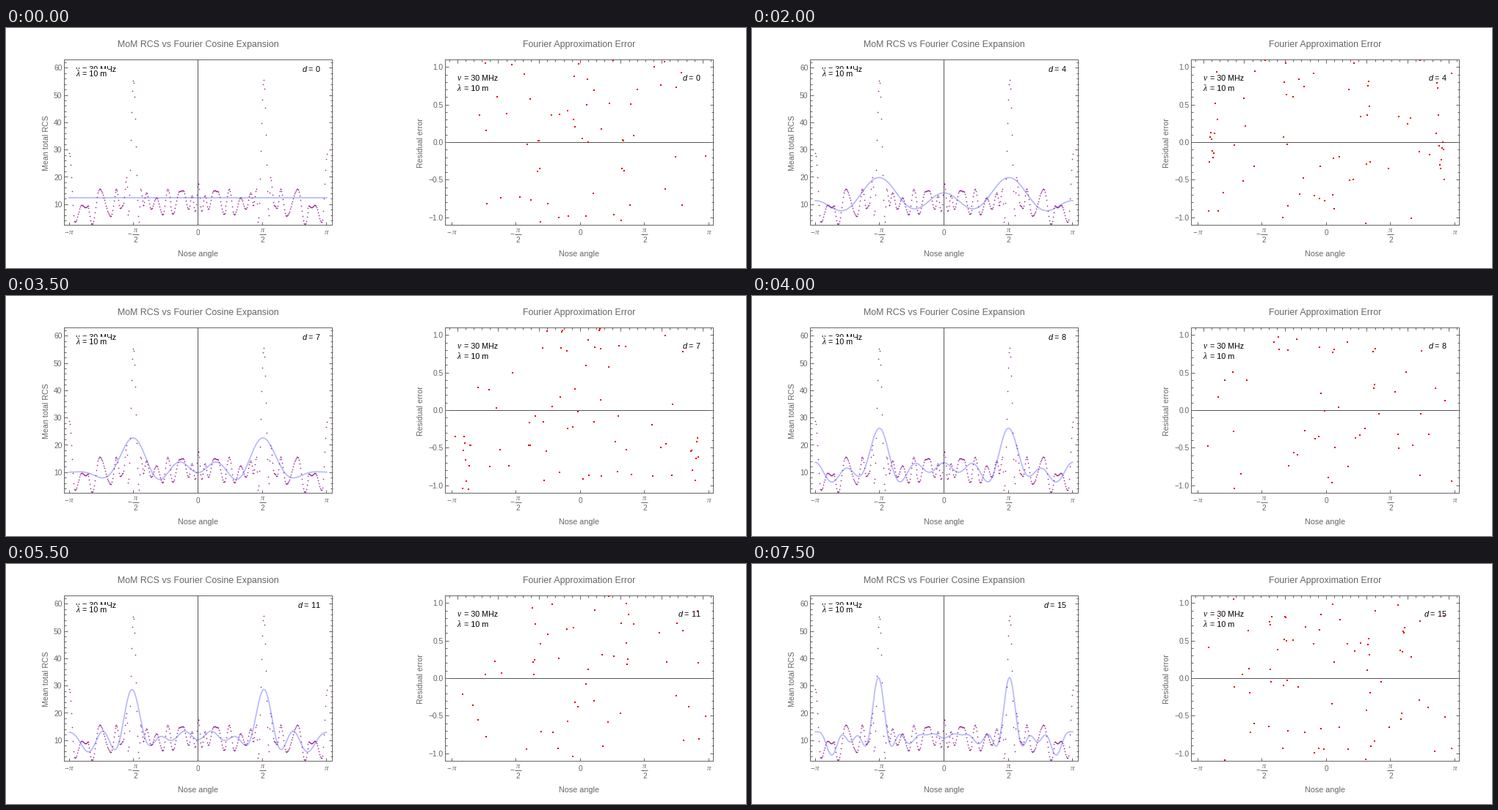
A matplotlib script that plays this animation: 1008 by 328 pixels, repeating every 8000 ms.

```python
import numpy as np
import matplotlib.pyplot as plt
from matplotlib.animation import FuncAnimation

plt.rcParams.update({
    "font.family": "Liberation Sans",
    "mathtext.fontset": "custom",
    "mathtext.rm": "Liberation Sans",
    "mathtext.it": "Liberation Sans:italic",
})

W, H, DPI = 1008, 328, 64
PT = 72 / DPI                      # points per pixel
GREY, AXIS, INK = "#666666", "#555555", "black"
TOP, BOTTOM = 43, 269
DEGREES = 16

# Turning points of the scattering lobes: angle from the nose, mean level
LOBES = [
    (0, 17.6), (4.5, 7.6), (9, 13.3), (13.5, 8.4), (21, 15.2), (26, 14.9),
    (35, 6.5), (43, 15.6), (49.6, 6.3), (58.5, 12.5), (65.5, 8.3),
    (72, 14.3), (76.5, 9.7), (80.9, 15.7), (83, 3.5), (90.7, 55.6),
    (97.8, 6), (99.6, 20), (105, 9.7), (108.5, 8.6), (114, 15.8),
    (122.5, 5.8), (137.8, 15.7), (148, 2.7), (154.5, 9.5), (158, 8.9),
    (163, 9.9), (172.5, 3.5), (180, 28.8),
]


def level(deg):
    """Cosine-eased lobes, mirrored; the right half sits a little further out."""
    angle, value = np.array(LOBES).T
    u = np.abs(deg)
    u = np.where(deg > 0, np.abs(u - np.interp(u, [0, 140, 180], [0.7, 1.4, 0.4])), u)
    i = np.clip(np.searchsorted(angle, u, side="right") - 1, 0, len(angle) - 2)
    t = (u - angle[i]) / (angle[i + 1] - angle[i])
    return value[i] + (value[i + 1] - value[i]) * (1 - np.cos(np.pi * t)) / 2


def cosines(deg, count):
    return np.cos(np.outer(np.radians(deg), np.arange(count)))


deg = np.arange(-180, 181)
fine = np.linspace(-180, 180, 721)
rcs = level(deg)
coef = 2 * np.mean(rcs[1:, None] * cosines(deg[1:], DEGREES), axis=0)
coef[0] /= 2


def expansion(x, degree):
    return cosines(x, degree + 1) @ coef[:degree + 1]


def left_x(a):
    return 261.5 + 0.974 * a


def left_y(v):
    return 241.2 - 3.728 * (v - 10)


def right_x(a):
    return 782.3 + 0.972 * a


def right_y(v):
    return 156.5 - 102.7 * v


fig = plt.figure(figsize=(W / DPI, H / DPI), dpi=DPI, facecolor="white")
ax = fig.add_axes([0, 0, 1, 1])
ax.set_xlim(0, W)
ax.set_ylim(H, 0)
ax.axis("off")


def line(xs, ys, color=GREY):
    """Crisp one-pixel line; whole coordinates name the pixel."""
    ax.plot(np.floor(xs), np.floor(ys), color=color, lw=PT, zorder=2,
            snap=True, solid_capstyle="butt")


def text(x, y, s, size=10.8, color=GREY, **kw):
    kw = {"ha": "center", "va": "baseline", "zorder": 7, **kw}
    return ax.text(x, y, s, fontsize=size * PT, color=color, **kw)


def greek(x, y, s, size=11.5, color=INK, **kw):
    return text(x, y, s, size, color, family="Liberation Serif",
                style="italic", **kw)


def cover(x, y, w, h):
    ax.add_patch(plt.Rectangle((x, y), w, h, fc="white", ec="none", zorder=6))


def note(x, y, symbol, s, z=7):
    greek(x + 1.5, y, symbol, zorder=z)
    text(x + 8, y, s, color=INK, ha="left", zorder=z)


def angle_label(x, q):
    """Label for q quarter turns."""
    if q == 0:
        text(x, 283, "0", 10)
    elif q % 2:
        x += 2.5 if q < 0 else 0
        greek(x, 279, "π", 10.5, GREY)
        line([x - 4, x + 5], [282, 282])
        text(x, 293, "2", 10)
        if q < 0:
            text(x - 7.5, 285.5, "−", 10)
    else:
        greek(x + (3 if q < 0 else 0), 282.5, "π", 11, GREY)
        if q < 0:
            text(x - 4, 283, "−", 10)


def panel(x0, x1, title, ylabel, label_x, to_x):
    line([x0, x1, x1, x0, x0], [TOP, TOP, BOTTOM, BOTTOM, TOP])
    mid = (x0 + x1) / 2
    text(mid, 26, title, 12.4)
    text(mid, 312, "Nose angle")
    text(label_x, 157, ylabel, 10.6, rotation=90, va="center")
    for q in range(-2, 3):
        x = to_x(90 * q)
        line([x, x], [BOTTOM, BOTTOM - 4])
        angle_label(x, q)


def y_ticks(x0, x1, values, to_y, every, fmt):
    for v in values:
        y = to_y(v)
        major = abs(v / every - round(v / every)) < 1e-6
        size = 5 if major else 3
        line([x0, x0 + size], [y, y])
        line([x1 - size + 1, x1 + 1], [y, y])
        if major:
            label = fmt.format(v + 0.0).replace("-", "−")
            text(x0 - 2.5, y + 3.6, label, 10.2, ha="right")


# Left panel: samples and expansion
panel(79, 444, "MoM RCS vs Fourier Cosine Expansion", "Mean total RCS",
      54.5, left_x)
line([261, 261], [TOP, BOTTOM], AXIS)
y_ticks(79, 444, range(4, 63, 2), left_y, 10, "{:.0f}")
note(96, 60, "ν", "= 30 MHz", z=5)
cover(93, 55.5, 46, 13)
note(96, 66, "λ", "= 10 m")

# Right panel: residuals
panel(598, 963, "Fourier Approximation Error", "Residual error",
      565.5, right_x)
line([598, 963], [156, 156], AXIS)
y_ticks(598, 963, np.arange(-10, 11) / 10, right_y, 0.5, "{:.1f}")
for i in range(-16, 17):
    x = right_x(np.degrees(i / 5))
    line([x, x], [TOP, TOP + (3 if i % 5 else 5)])
cover(614, 62, 59, 11.5)
cover(614, 76, 46, 11.5)
note(615.5, 72, "ν", "= 30 MHz")
note(615.5, 86, "λ", "= 10 m")

seen = rcs > 2.5
ax.plot(left_x(deg[seen]), left_y(rcs[seen]), "o", color=(0.5, 0, 0.5),
        ms=1.7 * PT, mew=0, alpha=0.8, zorder=3)
curve, = ax.plot([], [], color=(0.3, 0.3, 1), alpha=0.4, lw=1.7 * PT, zorder=4)
dots, = ax.plot([], [], "s", color="#ee0000", ms=2 * PT, mew=0, zorder=4)
counters = [text(428.5, 60, "", color=INK, ha="right"),
            text(946.5, 72, "", color=INK, ha="right")]


def draw(degree):
    curve.set_data(left_x(fine), left_y(expansion(fine, degree)))
    res = rcs - expansion(deg, degree)
    near = np.abs(res) <= 1.1
    dots.set_data(right_x(deg[near]), right_y(res[near]))
    for label in counters:
        label.set_text(f"$d$ = {degree}")
    return [curve, dots, *counters]


anim = FuncAnimation(fig, draw, frames=DEGREES, interval=500, repeat=True,
                     repeat_delay=0, blit=False)
plt.show()
```
